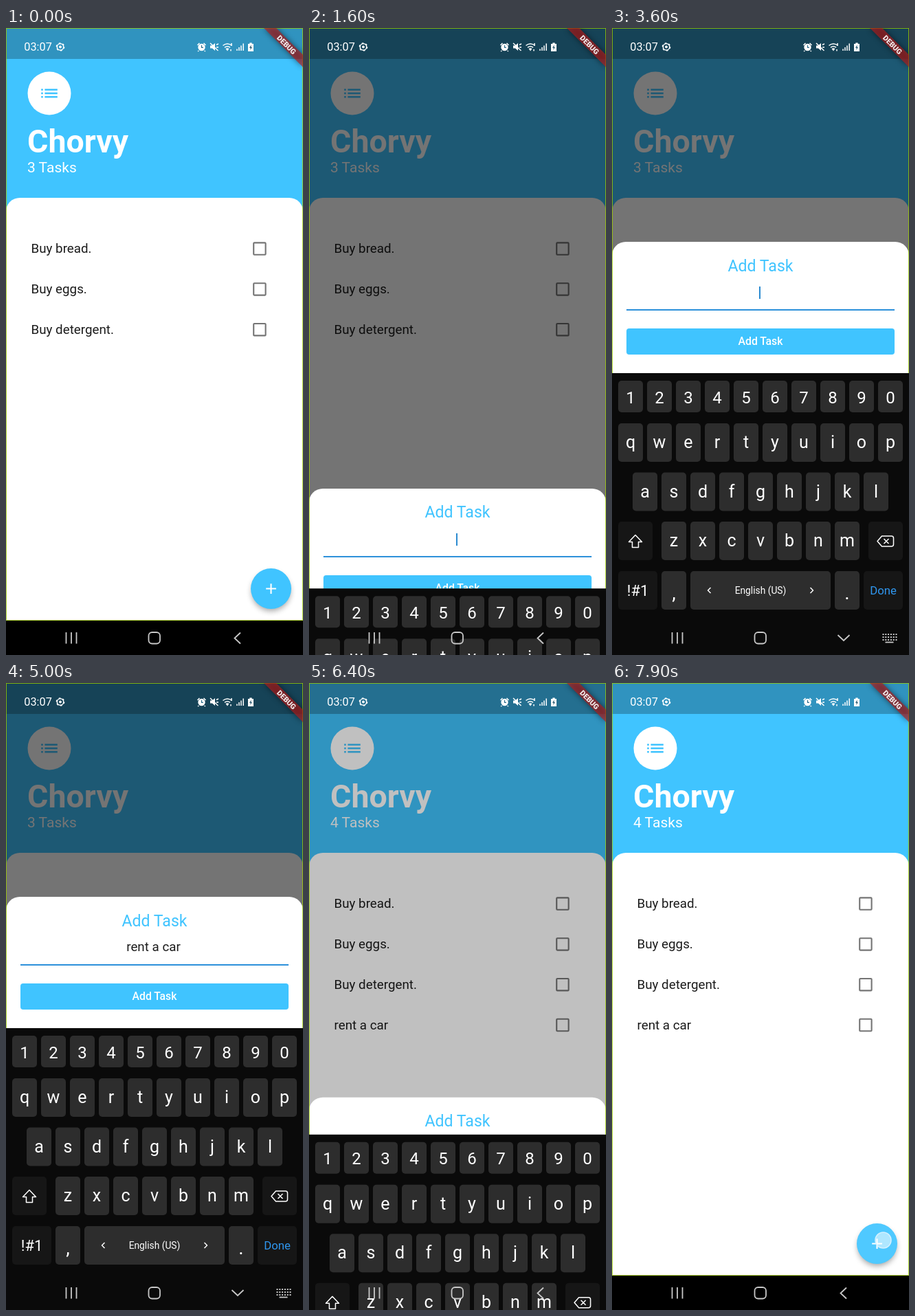
Recreate the animation shown at these times as an HTML page. Size 432 px wide and 912 px high, loop 8 s.

```html
<!DOCTYPE html>
<html lang="en">
<head>
<meta charset="utf-8">
<title>Task list</title>
<style>
  html, body { margin: 0; width: 100%; height: 100%; overflow: hidden; background: #000; }
  svg { display: block; width: 100%; height: 100%; font-family: Roboto, sans-serif; }
  .mid { text-anchor: middle; }
  .line { fill: none; stroke: #fff; stroke-width: 1.5; }
  .item { font-size: 18.8px; fill: #1c1c1c; }
  .nav { fill: none; stroke: #c8c8c8; stroke-width: 1.8; }
</style>
</head>
<body>
<svg id="stage" viewBox="0 0 432 912">
  <defs>
    <filter id="soft" x="-50%" y="-50%" width="200%" height="200%"><feGaussianBlur stdDeviation="4"/></filter>
    <clipPath id="screen"><rect width="432" height="862"/></clipPath>
  </defs>

  <g clip-path="url(#screen)">
    <rect width="432" height="862" fill="#40c4ff"/>
    <rect width="432" height="45" fill="#000" opacity=".25"/>
    <circle cx="63" cy="95" r="31.5" fill="#fff"/>
    <path d="M51.2 89.7h2.6m2.6 0h18.4M51.2 95h2.6m2.6 0h18.4M51.2 100.2h2.6m2.6 0h18.4" stroke="#40c4ff" stroke-width="2.6"/>
    <text x="31" y="181" font-size="46.5" font-weight="700" fill="#fff">Chorvy</text>
    <text id="count" x="31" y="210" font-size="21" fill="#fff">3 Tasks</text>
    <rect y="247" width="432" height="660" rx="20" fill="#fff"/>
    <g id="list"></g>
    <circle cx="385.5" cy="820" r="28" opacity=".36" filter="url(#soft)"/>
    <circle cx="385.5" cy="815.5" r="29.5" fill="#40c4ff"/>
    <circle id="glow" cx="385.5" cy="815.5" r="29.5" fill="#fff"/>
    <path d="M378.2 815.5h14.7M385.5 808.2v14.7" stroke="#fff" stroke-width="2.1"/>
    <rect id="scrim" width="432" height="862"/>

    <g id="sheet">
      <rect width="432" height="700" rx="20" fill="#fff"/>
      <text class="mid" x="216" y="42.5" font-size="23.1" fill="#40c4ff">Add Task</text>
      <text id="entry" class="mid item" x="214.5" y="79"></text>
      <rect id="caret" y="65" width="2" height="18" fill="#2b8bd0"/>
      <rect x="21" y="98" width="390" height="2" fill="#2c90da"/>
      <rect x="21" y="126" width="390" height="38" rx="4" fill="#40c4ff"/>
      <text class="mid" x="216" y="150" font-size="15.75" font-weight="500" fill="#fff">Add Task</text>
    </g>
  </g>

  <rect x=".5" y=".5" width="431" height="861" fill="none" stroke="#9ac800" stroke-opacity=".8"/>

  <g id="status" fill="#fff">
    <text x="26.3" y="33" font-size="16.3">03:07</text>
    <circle class="line" cx="79" cy="27.5" r="4.7"/>
    <circle class="line" cx="79" cy="27.5" r="5.6" stroke-dasharray="2.6 3.26"/>
    <circle cx="79" cy="27.5" r="1.9"/>
    <circle cx="284.5" cy="28" r="5.2"/>
    <path class="line" d="M278.5 25l3-3M290.5 25l-3-3M280.5 33l-1.5 1M288.5 33l1.5 1"/>
    <path d="M284.5 25v3.4h2.4" fill="none" stroke="#2b6d8c" stroke-width="1.2"/>
    <path d="M297 25.5h3l4-3.5v11l-4-3.5h-3z"/>
    <path class="line" d="M297 22l11.5 11M306 24.5l3-1.5M306 28h3"/>
    <path class="line" d="M315.5 25.5q6.500-5 13 0M318 28.300q4-3 8 0" stroke-width="1.3"/>
    <path d="M319.500 30q2.500-1.500 5 0l-2.500 3.500z"/>
    <path class="line" d="M328 22v4M327 31v2.500"  stroke-width="1.2"/>
    <path class="line" d="M336 33v-2.500M339 33v-5M342 33v-7.500M345.200 33v-10.500"/>
    <path d="M354.300 21.500h3.400v1.500h2.300v11h-8v-11h2.300z"/>
    <path d="M356.700 24.500l-2.700 4.300h1.800l-.5 3.200 2.700-4.300h-1.800z" fill="#1c5069"/>
  </g>

  <path d="M375 0h18l39 39v18z" opacity=".5" filter="url(#soft)"/>
  <path d="M375 0h18l39 39v18z" fill="#b71c1c" fill-opacity=".63"/>
  <text class="mid" transform="translate(408 24.500) rotate(45)" y="3.700" font-size="10.700" font-weight="900" fill="#fff" fill-opacity=".9">DEBUG</text>

  <rect y="862" width="432" height="50"/>
  <g id="keyboard"><rect y="502" width="432" height="410" fill="#0a0a0a"/></g>
  <g class="nav">
    <path d="M87.500 879v16.500M95 879v16.500M102.500 879v16.500"/>
    <rect x="207.500" y="879" width="16.500" height="16.500" rx="5"/>
    <path id="back" d="M341 879.500l-8.500 8 8.500 8"/>
    <g id="hide">
      <path d="M328.500 883l8.500 8 8.500-8"/>
      <path d="M393.500 882h21M393.500 886h21M393.500 890h21" stroke-width="2" stroke-dasharray="2 1.800"/>
      <path d="M397.500 893.500h12" stroke-width="1.800"/>
    </g>
  </g>
  <circle id="touch" r="11.500" fill="#fff" fill-opacity=".55" stroke-width="1.500"/>
</svg>

<script>
const LOOP = 8000, SVG = 'http://www.w3.org/2000/svg';
const $ = id => document.getElementById(id);
const clamp = v => Math.min(1, Math.max(0, v));
const ramp = (t, a, b) => clamp((t - a) / (b - a));
const smooth = u => u * u * (3 - 2 * u);
const between = (t, a, b) => t >= a && t < b;

function add(parent, tag, attrs, text = '') {
  const el = document.createElementNS(SVG, tag);
  for (const name in attrs) el.setAttribute(name, attrs[name]);
  el.textContent = text;
  return parent.appendChild(el);
}

// Task rows
const rows = ['Buy bread.', 'Buy eggs.', 'Buy detergent.', 'rent a car'].map((label, i) => {
  const row = add($('list'), 'g', { transform: `translate(0 ${321 + 58.8 * i})` });
  add(row, 'text', { class: 'item', x: 36.5, y: 6.3 }, label);
  add(row, 'rect', { x: 360.2, y: -8.6, width: 17.4, height: 17.4, rx: 1, fill: 'none', stroke: '#757575', 'stroke-width': 2.1 });
  return row;
});

// Keyboard
function key(x, y, w, label, { h = 56, size = 25, dy = 36, dark = false, color = '#fff' } = {}) {
  add($('keyboard'), 'rect', { x, y, width: w, height: h, rx: 5, fill: dark ? '#161616' : '#2d2d2d' });
  add($('keyboard'), 'text', { class: 'mid', x: x + w / 2, y: y + dy, 'font-size': size, fill: color }, label);
}
const keyRow = (chars, x, y, opts) => [...chars].forEach((c, i) => key(x + 42 * i, y, 36, c, opts));
keyRow('1234567890', 9, 513, { h: 46, size: 24, dy: 32.500 });
keyRow('qwertyuiop', 9, 575);
keyRow('asdfghjkl', 30, 646.500);
keyRow('zxcvbnm', 72, 718);
key(9, 718, 50, '', { dark: true });
key(373, 718, 50, '', { dark: true });
key(9, 790, 57, '!#1', { dark: true, size: 22 });
key(72, 790, 36, ',', { size: 28, dy: 41 });
key(114, 790, 204, 'English (US)', { size: 13.8, dy: 33 });
key(324, 790, 36, '.', { size: 28, dy: 41 });
key(366, 790, 57, 'Done', { dark: true, size: 16.8, dy: 34, color: '#2f96ee' });
[
  'M34 737.500l9.500 10h-5v8h-9v-8h-5z',
  'M392.500 739h14q3 0 3 3v9q0 3-3 3h-14l-6.500-7.500zM395.500 743l7 7M402.500 743l-7 7',
  'M143.500 814l-4 4 4 4M288.500 814l4 4-4 4'
].forEach(d => add($('keyboard'), 'path', { class: 'line', d, 'stroke-linejoin': 'round' }));

const show = (el, on) => el.setAttribute('visibility', on ? 'visible' : 'hidden');
const moveY = (id, y) => $(id).setAttribute('transform', `translate(0 ${y})`);
const caretOn = [[1200, 2000], [2500, 3000], [3600, 4000], [4400, 5000], [5500, 6000]];

function draw(t) {
  const added = t >= 6250, typed = t >= 4400;
  const opening = ramp(t, 700, 1100), closing = ramp(t, 6250, 6500);

  $('count').textContent = (added ? 4 : 3) + ' Tasks';
  show(rows[3], added);

  $('scrim').setAttribute('opacity', .545 * opening * (1 - closing ** 1.2));
  const rise = 192 * (1 - (1 - opening) ** 3);
  const lift = 359 * smooth(ramp(t, 1600, 1820));
  moveY('sheet', 862 - rise - lift + 600 * closing ** 1.43);
  const up = smooth(ramp(t, 1500, 1820)) * (1 - smooth(ramp(t, 6330, 6500)));
  moveY('keyboard', 410 * (1 - up));
  show($('keyboard'), up > 0);

  $('entry').textContent = typed ? 'rent a car' : '';
  $('caret').setAttribute('x', typed ? 254 : 214);
  show($('caret'), caretOn.some(([a, b]) => between(t, a, b)));

  const keysOpen = between(t, 1650, 6250);
  show($('hide'), keysOpen);
  show($('back'), !keysOpen);

  // Finger taps: add button, sheet button, add button again
  const onSheet = between(t, 6150, 6400);
  const press = onSheet ? ramp(t, 6150, 6200) * (1 - .7 * ramp(t, 6200, 6300)) * (t < 6380)
    : t < 1000 ? ramp(t, 350, 450) * (1 - ramp(t, 650, 750))
    : ramp(t, 7750, 7850);
  $('touch').setAttribute('cx', onSheet ? 330 : 394.500);
  $('touch').setAttribute('cy', onSheet ? 474.500 : 810.500);
  $('touch').setAttribute('stroke', onSheet ? '#aaa' : '#d4f1ff');
  $('touch').setAttribute('opacity', press);
  $('glow').setAttribute('opacity', onSheet ? 0 : .08 * press);
}

function tick() {
  draw(performance.now() % LOOP);
  requestAnimationFrame(tick);
}
tick();
</script>
</body>
</html>
```
